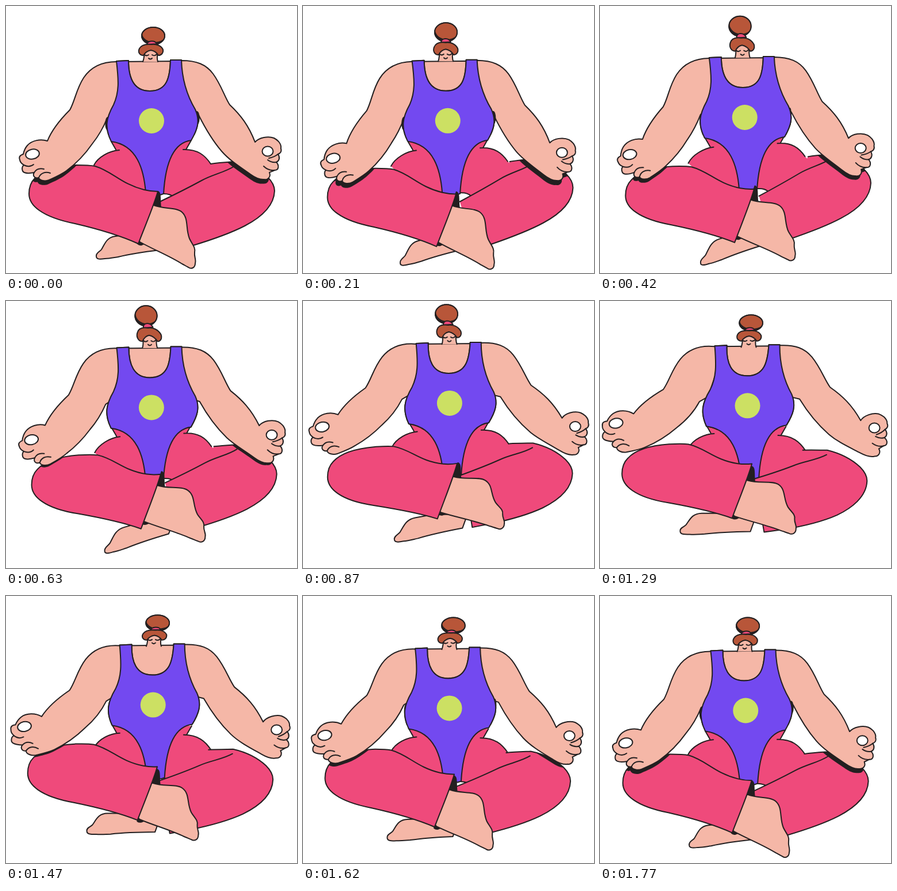
Recreate the animation shown at these times as an HTML page with a canvas. Size 506 by 465 pixels, loop 1.8 s.

```html
<!DOCTYPE html>
<html lang="en">
<head>
<meta charset="utf-8">
<title>Floating meditation</title>
<style>
  html, body { margin: 0; width: 100%; height: 100%; overflow: hidden; background: #fff; }
  canvas { display: block; }
</style>
</head>
<body>
<canvas id="stage" width="506" height="465"></canvas>
<script>
const ctx = document.getElementById('stage').getContext('2d');
const LOOP = 1800, STEP = 30, RAD = Math.PI / 180;
const INK = '#231f20', SKIN = '#f5b7a7', PINK = '#ef4a7b', VIOLET = '#7349f0',
      HAIR = '#b85639', LIME = '#cce063';

let phase = 0; // degrees through the loop

// Everything floats on one sine; parts differ in reach and lag. Zero at the loop start.
const swing = (lag) => Math.cos((phase - lag) * RAD);
const wave = (reach, lag) => reach * (swing(lag) - Math.cos(lag * RAD));
const mix = (a, b, u) => a + (b - a) * u;
const clamp = u => Math.max(0, Math.min(1, u));

// Part that drifts differently at its two ends, blended along the line between them.
function floating(from, to, ease = 1) {
  const dx = to.at[0] - from.at[0], dy = to.at[1] - from.at[1];
  return (x, y) => {
    const along = ((x - from.at[0]) * dx + (y - from.at[1]) * dy) / (dx * dx + dy * dy);
    const u = clamp(along) ** ease;
    return [x + mix(wave(...from.sway), wave(...to.sway), u),
            y + mix(wave(...from.bob), wave(...to.bob), u)];
  };
}

// Chain of bones that each turn about their joint; skin bends softly between them.
function chain(root, bones) {
  const [first, , last] = bones;
  const reach = Math.hypot(last.at[0] - first.at[0], last.at[1] - first.at[1]);
  const dir = [0, 1].map(i => (last.at[i] - first.at[i]) / reach);
  const turn = (bone, base, x, y) => {
    const a = wave(...bone.turn) * RAD, dx = x - bone.at[0], dy = y - bone.at[1];
    return [base[0] + dx * Math.cos(a) - dy * Math.sin(a),
            base[1] + dx * Math.sin(a) + dy * Math.cos(a)];
  };
  return (x, y) => {
    let base = root(...first.at);
    let point = turn(first, base, x, y);
    for (let i = 1; i < bones.length; i++) {
      const at = bones[i].at;
      base = turn(bones[i - 1], base, ...at);
      const u = clamp(((x - at[0]) * dir[0] + (y - at[1]) * dir[1]) / 40 + 0.5);
      const bent = turn(bones[i], base, x, y), soft = u * u * (3 - 2 * u);
      point = point.map((p, axis) => mix(p, bent[axis], soft));
    }
    return point;
  };
}

const torso = floating(
  { at: [250, 96], sway: [5.2, 240], bob: [12, 20] },
  { at: [250, 236], sway: [1.6, 250], bob: [12, 20] });
const hips = floating(
  { at: [153, 277], sway: [1, 200], bob: [14, 32] },
  { at: [356, 275], sway: [1, 200], bob: [13, 354] });
const legL = floating(
  { at: [40, 327], sway: [3.5, 110], bob: [17, 50] },
  { at: [264, 327], sway: [3, 130], bob: [25.5, 35] }, 2);
const legR = floating(
  { at: [467, 330], sway: [3.5, 100], bob: [11.5, 338] },
  { at: [270, 330], sway: [8, 105], bob: [20, 20] }, 2);
const foot = floating(
  { at: [245, 380], sway: [4, 130], bob: [23, 24] },
  { at: [329, 448], sway: [10.5, 175], bob: [34, 25] });
const backFoot = floating(
  { at: [266, 425], sway: [12, 115], bob: [16, 20] },
  { at: [158, 437], sway: [18, 90], bob: [24.5, 62] });
const head = floating(
  { at: [251, 97], sway: [5.5, 248], bob: [11.5, 16] },
  { at: [251, 52], sway: [10.5, 285], bob: [15, 345] }, 2);
const armL = chain(torso, [
  { at: [192, 96], turn: [4, 228] },
  { at: [111, 181], turn: [10, 237] },
  { at: [72, 235], turn: [11, 258] }]);
const armR = chain(torso, [
  { at: [305, 95], turn: [1.8, 50] },
  { at: [389, 172], turn: [5.5, 30] },
  { at: [433, 237], turn: [5.5, 68] }]);

// Artwork at the loop start, absolute coordinates only.
const KNEE_R = 'C370 273 385 272 398 271 C425 276 442 286 455 298 C463 306 467 314 467 322 ' +
  'C466 350 440 370 415 383 C388 397 355 408 322 418 L290 428 L285 400';
const LAP_R = 'M267 341 C290 330 318 316 340 304';
const ART = {
  chest: 'M198 97 L300 96 L290 140 L250 158 L212 140 Z',
  suit: 'M192 96 L213 95 C213 125 222 148 250 148 C280 148 285 125 286 94 L305 94 ' +
    'C306 130 316 158 329 180 C338 200 333 215 322 234 C290 238 277 275 274 327 L268 329 L243 326 ' +
    'C240 285 228 242 183 236 C171 212 174 195 187 172 C197 150 196 130 192 96 Z',
  hips: 'M183 236 L191 251 C175 254 160 263 153 277 L182 305 L243 330 L274 327 C282 327 288 329 292 333 ' +
    'L320 322 L370 290 L356 275 C346 260 333 251 313 250 L322 234 Z',
  hipLines: 'M183 236 L191 250 M153 277 C160 263 180 252 197 251 M322 234 L313 250 ' +
    'M308 250 C333 249 346 260 356 275 M274 327 C282 327 288 329 292 333',
  legL: 'M50 300 C65 283 95 278 122 277 C135 277 145 277 155 279 C185 288 200 310 240 320 ' +
    'C248 322 256 323 264 323 C258 345 245 375 230 414 C195 398 150 386 120 379 ' +
    'C90 373 72 366 58 356 C45 347 40 338 40 327 C40 315 44 306 50 300 Z',
  legR: LAP_R + ' L356 275 ' + KNEE_R + ' Z',
  legLinesR: LAP_R + ' C360 293 380 290 397 279 M356 275 ' + KNEE_R,
  cuffs: 'M264 323 C270 325 267 338 269 350 L256 348 Z M234 408 L229 414 C233 418 239 416 242 412 Z',
  foot: 'M250 346 L257 347 C275 354 296 350 306 359 C318 370 312 388 319 405 C323 414 330 420 328 429 ' +
    'C327 437 331 442 329 448 C329 456 322 459 317 455 C313 453 310 451 306 449 ' +
    'C282 434 258 425 233 411 L222 398 L240 350 Z',
  backFoot: 'M215 398 L190 401 C175 403 172 414 166 424 C163 428 156 430 157 436 C157 442 165 441 172 440 ' +
    'C180 440 188 438 195 437 C220 431 242 428 266 425 L275 400 Z',
  armL: 'M192 97 C165 97 147 107 135 125 C122 145 120 165 111 181 C95 197 80 215 72 235 ' +
    'C60 231 45 234 37 243 C32 249 31 253 30 258 C24 260 22 263 24 268 C25 274 29 275 31 277 ' +
    'C27 280 27 288 32 290 C37 292 44 291 49 290 C46 295 49 301 57 299 C58 304 68 306 75 303 ' +
    'C88 297 97 293 105 287 C125 272 139 256 150 240 C162 225 170 210 176 195 L190 185 L202 130 L200 97 Z',
  fingersL: 'M31 277 C37 280 43 280 48 276 M49 290 C52 285 58 282 66 284 M57 299 C60 291 68 288 77 291',
  armR: 'M305 95 C332 95 348 102 360 118 C374 137 380 158 389 172 C408 190 422 208 433 237 ' +
    'C440 229 456 226 466 230 C470 232 472 234 474 236 C478 241 479 244 478 248 C480 254 476 257 473 258 ' +
    'C477 264 475 270 470 272 C475 277 475 286 467 286 C463 288 460 289 458 290 ' +
    'C461 297 456 303 449 302 C440 303 432 298 425 293 C405 279 388 268 375 253 ' +
    'C357 232 346 212 335 190 L318 185 L296 130 L298 96 Z',
  fingersR: 'M473 258 C468 262 462 264 457 265 M470 272 C464 273 459 271 455 268 M467 286 C458 287 452 283 448 279',
  face: 'M238 97 C240 92 240 88 241 80 L252 74 L264 80 C262 90 263 94 264 97',
  hair: 'M252 77 C246 78 242 81 239 86 C232 86 229 80 232 74 C236 67 245 66 253 67 C262 66 270 69 273 76 ' +
    'C274 82 270 86 265 86 C262 81 258 78 252 77 Z',
  smile: 'M241 85 C243 87 245 87 248 85 M254 85 C257 87 259 87 262 84 M248 91 C250 93 252 93 254 91',
  tie: 'M245 67 C246 60 259 59 262 66 Z'
};

const shape = (art, rig) => new Path2D(ART[art].replace(/(\d+) (\d+)/g,
  (_, x, y) => rig(+x, +y).map(n => n.toFixed(2)).join(' ')));

function paint(path, fill, outline = true) {
  if (fill) { ctx.fillStyle = fill; ctx.fill(path); }
  if (outline) ctx.stroke(path);
}

function oval([x, y], rx, ry, tilt = 0) {
  const path = new Path2D();
  path.ellipse(x, y, rx, ry, tilt, 0, Math.PI * 2);
  return path;
}

function within(path, draw) {
  ctx.save();
  ctx.clip(path);
  draw();
  ctx.restore();
}

function drawArm(side, rig, leg, hole) {
  const arm = shape('arm' + side, rig);
  within(leg, () => {
    ctx.translate(-2, 4 + 4 * swing(30));
    paint(arm, INK, false);
  });
  paint(arm, SKIN);
  paint(shape('fingers' + side, rig));
  paint(hole, '#fff');
}

function drawHead() {
  const [x, y] = head(256, 52);
  const stretch = wave(2, 110), rx = 20 - stretch / 3, ry = 15 + stretch;
  const bun = oval([x, y], rx, ry);
  paint(shape('face', head), SKIN);
  paint(shape('smile', head));
  paint(bun, INK);
  within(bun, () => paint(oval([x + 2, y - 4], rx + 1, ry), HAIR, false));
  paint(bun);
  paint(shape('tie', head), PINK);
  paint(shape('hair', head), HAIR);
}

function draw(t) {
  phase = t / LOOP * 360;
  ctx.fillStyle = '#fff';
  ctx.fillRect(0, 0, 506, 465);
  ctx.strokeStyle = INK;
  ctx.lineWidth = 2;
  ctx.lineJoin = ctx.lineCap = 'round';

  const suit = shape('suit', torso);
  const left = shape('legL', legL), right = shape('legR', legR);

  paint(shape('backFoot', backFoot), SKIN);
  paint(shape('hips', hips), PINK, false);
  paint(shape('hipLines', hips));
  paint(shape('chest', torso), SKIN);
  paint(suit, VIOLET);
  paint(right, PINK, false);
  paint(shape('legLinesR', legR));
  paint(shape('cuffs', foot), INK);
  paint(shape('foot', foot), SKIN);
  paint(left, PINK);
  drawArm('L', armL, left, oval(armL(46, 258), 12, 8.5, -0.2));
  drawArm('R', armR, right, oval(armR(455, 253), 9.5, 8.5));

  // The upper suit overlaps the arms, the lower suit stays behind the legs.
  const upper = new Path2D();
  upper.rect(0, 0, 506, 225);
  within(upper, () => {
    const gap = 5 * Math.max(0, swing(20));
    paint(oval(torso(177, 205), gap, 12), INK, false);
    paint(oval(torso(332, 195), gap, 12), INK, false);
    paint(suit, VIOLET);
  });
  paint(oval(torso(253, 200), 22, 22), LIME, false);
  drawHead();
}

function tick() {
  draw(Math.floor(performance.now() % LOOP / STEP) * STEP);
  requestAnimationFrame(tick);
}
tick();
</script>
</body>
</html>
```
